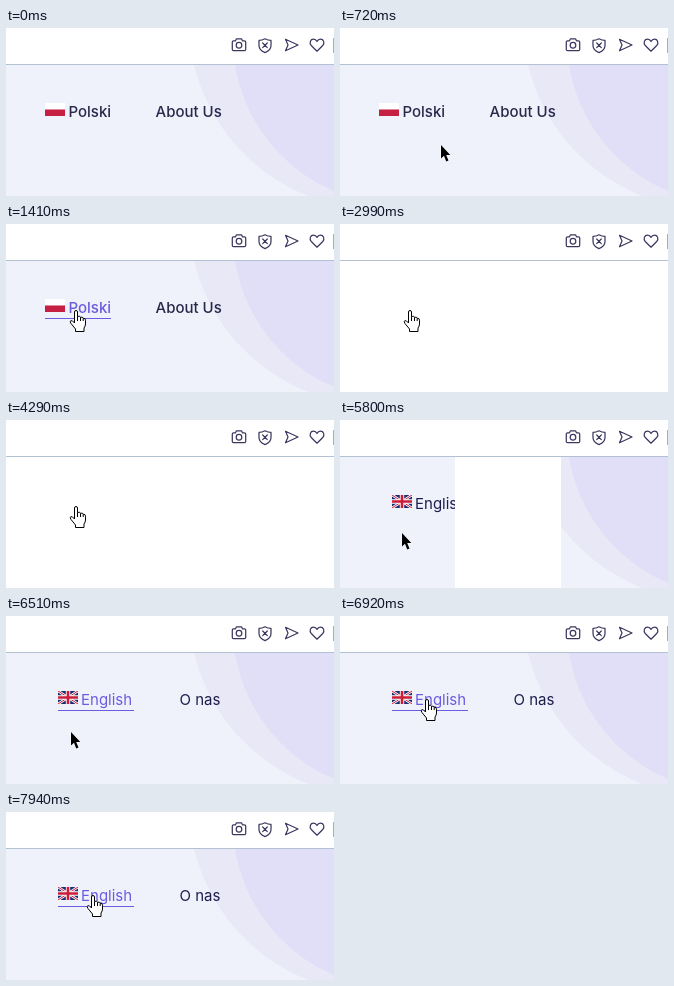
An HTML page that plays this animation: 328x168 px, repeating every 8000 ms.

```html
<!DOCTYPE html>
<html lang="en">
<head>
<meta charset="utf-8">
<title>Language switch</title>
<style>
  html, body { margin: 0; width: 100%; height: 100%; overflow: hidden; background: #fff; }
  svg { display: block; width: 100vw; height: 100vh; }
  text { font: 500 15px Inter, sans-serif; fill: #29284b; }
  #english text { font-weight: 400; fill: #1f1d4c; }
  .underline { fill: none; }
  .hover text.link, #english .hover text.link { fill: #6d5be0; }
  .hover .underline { fill: #6d5be0; }
  .icons { fill: none; stroke: #3c3960; stroke-width: 1.25; stroke-linejoin: round; stroke-linecap: round; }
</style>
</head>
<body>
<svg viewBox="0 0 328 168">
  <rect width="328" height="168" fill="#eff2fa"/>
  <circle cx="371.3" cy="-7.6" r="188.6" fill="#e8e8f7"/>
  <circle cx="392.2" cy="10.7" r="165.3" fill="#e1def8"/>

  <g id="polish">
    <g id="polishLink">
      <rect x="39" y="75" width="20" height="6.5" fill="#fff"/>
      <rect x="39" y="81.5" width="20" height="6.5" fill="#c51f41"/>
      <text class="link" x="62.5" y="89">Polski</text>
      <rect class="underline" x="39" y="94" width="66" height="1"/>
    </g>
    <text x="149.5" y="89">About Us</text>
  </g>

  <g id="english">
    <g id="englishLink">
      <svg x="52" y="75" width="20" height="13" viewBox="0 0 20 13">
        <rect width="20" height="13" fill="#1c2c72"/>
        <path d="M0 0L20 13M20 0L0 13" stroke="#fff" stroke-width="2.6"/>
        <path d="M0 0L20 13M20 0L0 13" stroke="#cc1c38" stroke-width="1"/>
        <path d="M10 0V13M0 6.5H20" stroke="#fff" stroke-width="4.4"/>
        <path d="M10 0V13M0 6.5H20" stroke="#cc1c38" stroke-width="2.6"/>
      </svg>
      <text class="link" x="75" y="89">English</text>
      <rect class="underline" x="52" y="94" width="76" height="1"/>
    </g>
    <text x="173.5" y="89">O nas</text>
  </g>

  <rect id="leftCurtain" y="37" height="131" fill="#fff"/>
  <rect id="rightCurtain" x="115" y="37" height="131" fill="#fff"/>

  <rect width="328" height="36" fill="#fff"/>
  <rect y="36" width="328" height="1" fill="#b2c2d2"/>
  <g class="icons">
    <path d="M227.5 12.8H229.5L230.5 10.8H235.5L236.5 12.8H238.5Q239.7 12.8 239.7 14V21.4Q239.7 22.6 238.5 22.6H227.5Q226.3 22.6 226.3 21.4V14Q226.3 12.8 227.5 12.8Z"/>
    <circle cx="233" cy="17.3" r="2.8"/>
    <path d="M259 10.8Q262 12.4 265 12.4V17.5Q265 22 259 24.6Q253 22 253 17.5V12.4Q256 12.4 259 10.8ZM256.7 15L261.3 19.6M261.3 15L256.7 19.6"/>
    <path d="M279.5 11.3L292 17L279.5 22.8L282 17Z"/>
    <path d="M311 23.2L305.5 17.8C302.6 14.5 304.8 11.2 307.5 11.2Q309.8 11.2 311 13.4Q312.2 11.2 314.5 11.2C317.2 11.2 319.4 14.5 316.5 17.8Z"/>
  </g>
  <rect x="327" y="10" width="1" height="15" fill="#a9abb8"/>

  <g id="cursor">
    <circle id="ring" r="12" fill="#ff0" fill-opacity=".47"/>
    <path id="arrow" d="M0 0V13.5L3 10.8L5.2 16.5L7.5 15.5L5.2 10H9.3Z" fill="#000" stroke="#fff" stroke-width=".8" paint-order="stroke"/>
    <path id="hand" transform="translate(-5 -1)" fill="#fff" stroke="#000" stroke-linejoin="round"
      d="M5.5 13V2A1.5 1.5 0 0 1 8.5 2V6.5Q11 5.5 11.5 7.3Q13.8 6.6 14.2 8.2Q16.5 8 16.5 10.2V14Q16.5 16 15 18V21.5H6.5V19L2 13.5Q.5 11.5 1.8 10.7T5.5 13M8.5 6.5V11M11.5 7.3V11M14.2 8.2V11"/>
  </g>
</svg>
<script>
  const LOOP = 8000;
  const $ = id => document.getElementById(id);
  const within = (t, from, to) => t >= from && t < to;
  const clamp = (v, low, high) => Math.min(high, Math.max(low, v));
  const show = (id, visible) => $(id).setAttribute('visibility', visible ? 'visible' : 'hidden');

  // Pointer hotspot: time, x, y
  const path = [
    [340, 154, 166], [1000, 68, 87],
    [4290, 68, 87], [4470, 62, 113],
    [6280, 62, 113], [6510, 65, 116], [6920, 85, 84]
  ];

  function pointerAt(t) {
    const next = path.findIndex(key => key[0] > t);
    if (next === 0) return path[0].slice(1);
    if (next < 0) return path[path.length - 1].slice(1);
    const [t0, x0, y0] = path[next - 1], [t1, x1, y1] = path[next];
    const u = (t - t0) / (t1 - t0), eased = u * u * (3 - 2 * u);
    return [x0 + (x1 - x0) * eased, y0 + (y1 - y0) * eased].map(Math.round);
  }

  // Both curtains retract leftwards: one accelerates, the other settles.
  function leftWidth(t) {
    if (t < 2990) return 0;
    return t < 5390 ? 115 : clamp(115 - Math.exp((t - 5390) * 0.0182), 0, 115);
  }
  function rightWidth(t) {
    if (t < 2990) return 0;
    if (t < 5770) return 213;
    const width = 108 * Math.exp((5800 - t) * 0.0142);
    return width < 1 ? 0 : Math.min(213, width);
  }

  function render(t) {
    show('polish', t < 2990);
    show('english', t >= 2990);
    $('polishLink').classList.toggle('hover', t >= 820);
    $('englishLink').classList.toggle('hover', t >= 6450);
    $('leftCurtain').setAttribute('width', Math.round(leftWidth(t)));
    $('rightCurtain').setAttribute('width', Math.round(rightWidth(t)));

    const visible = t >= 340 && !within(t, 7660, 7940);
    const hand = within(t, 850, 4320) || t >= 6660;
    show('arrow', visible && !hand);
    show('hand', visible && hand);
    show('ring', within(t, 1280, 1410) || within(t, 7530, 7660));
    $('cursor').setAttribute('transform', `translate(${pointerAt(t)})`);
  }

  const start = performance.now();
  function tick() {
    render((performance.now() - start) % LOOP);
    requestAnimationFrame(tick);
  }
  tick();
</script>
</body>
</html>
```
